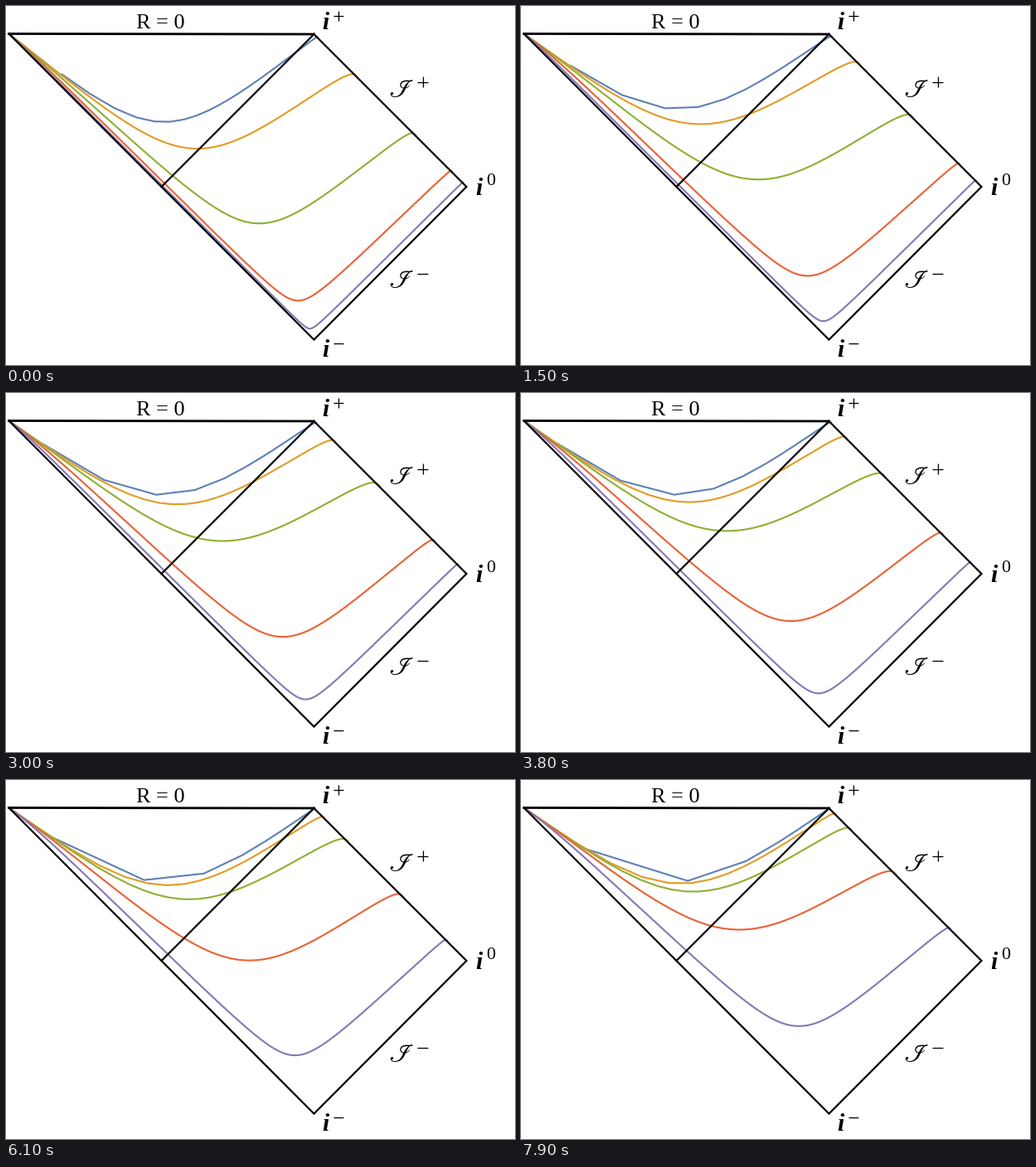
A matplotlib script that plays this animation: 614 px wide and 433 px high, repeating every 8000 ms.

```python
import matplotlib.pyplot as plt
import numpy as np
from matplotlib.animation import FuncAnimation

W, H, DPI = 614, 433, 100
FRAMES, STEP = 80, 100
SIDE = 368.5                     # length of a null edge in p and q
PX = 72 / DPI
COLORS = ["#5e81b5", "#e19c24", "#8fb032", "#eb6235", "#8778b3"]
BOOSTS = 1.29 * np.array([0, 2, 3, 4, 5])
RATE = 0.2567                    # boost per second

plt.rcParams["mathtext.fontset"] = "stix"

# Spacing and offset of the sample points as the slices settle
KEYS = [0, 0.8, 2.2, 3.8, 5.1, 7.0, 7.9]
SPACING = [0.075, 0.1306, 0.188, 0.206, 0.272, 0.335, 0.378]
OFFSET = [2.4, 1.24, 0.27, 0.13, -0.1, -0.1, -0.12]


def product(r):
    """Kruskal product UV at radius r, with M = 1."""
    return (1 - r / 2) * np.exp(r / 2)


def trumpet(r0, k=0.47):
    """Hyperboloidal slice ending at the cylinder r0: log V and r."""
    root = np.sqrt(2 / r0 - 1)
    c = (1 / (r0**2 * root) - k) * r0**3 / 2
    b = -root - k * r0 + c / r0**2
    d = np.geomspace(1e-6, 60, 4000)
    r = r0 + d
    a = k * r + b - c / r**2
    s = np.sqrt(np.maximum(a**2 + 1 - 2 / r, 1e-14))
    g = d / (s * (s - a)) / 4
    steps = (g[1:] + g[:-1]) / 2 * np.diff(np.log(d))
    log_v = np.concatenate([[0], np.cumsum(steps)])
    log_v += np.log(-product(r[-1])) - log_v[-1] - log_v[-1] * 0
    # scaled so that U tends to -1 at future null infinity
    return log_v, r


def to_stage(u, v):
    p = np.arctan(v) * 2 / np.pi * SIDE
    q = SIDE - np.arctan(u) * 2 / np.pi * SIDE
    return 3 + (p + q) / 2, 33.2 + (q - p) / 2


def slices(t):
    log_v, r = trumpet(1.852 + 0.051 * np.exp(-t / 0.6))
    n = np.arange(1, 41)
    near = (np.interp(t, KEYS, SPACING) * (n + np.interp(t, KEYS, OFFSET))) ** 2
    far = np.geomspace(near[-1], 1e15, 500)[1:]
    samples = np.log(np.concatenate([near, far]))
    for boost in BOOSTS:
        lv = samples - boost
        log_end = 0.535 - RATE * t + boost - BOOSTS[2]
        radius = np.interp(lv + log_end, log_v, r)
        v = np.exp(lv)
        yield to_stage(product(radius) / v, v)


fig = plt.figure(figsize=(W / DPI, H / DPI), dpi=DPI, facecolor="white")
ax = fig.add_axes([0, 0, 1, 1])
ax.set_xlim(-0.5, W - 0.5)
ax.set_ylim(H - 0.5, -0.5)
ax.axis("off")


def stroke(points, width=2.2, **kw):
    x, y = zip(*points)
    ax.plot(x, y, color="black", lw=width * PX, solid_joinstyle="miter", **kw)


def label(x, y, text, size, **kw):
    ax.text(x, y, text, fontsize=size * PX, family="Liberation Serif",
            va="baseline", **kw)


def sign(x, y, half, plus):
    stroke([(x - half, y), (x + half, y)], 1.3, solid_capstyle="butt")
    if plus:
        stroke([(x, y - half), (x, y + half)], 1.3, solid_capstyle="butt")


curves = [ax.plot([], [], color=c, lw=2.1 * PX, solid_joinstyle="round")[0]
          for c in COLORS]

LEFT, TOP, RIGHT, BOTTOM, MID = (3, 33), (371, 33.5), (555, 217.5), (371, 402), (187, 217.5)
stroke([TOP, RIGHT, BOTTOM, LEFT])
stroke([MID, TOP])
stroke([LEFT, TOP], 2.8)

label(156.5, 26.5, "R = 0", 26.2)
for x, y in [(381, 27.5), (566, 227.5), (381, 422.5)]:
    label(x, y, "i", 30, style="italic", weight="bold")
label(579, 216, "0", 22)
sign(400.5, 11.5, 5.8, True)
sign(400.5, 406, 5.8, False)
for y, plus in [(109, True), (340, False)]:
    label(461, y, r"$\mathscr{I}$", 31)
    sign(502, y - 18, 6.8, plus)


def draw(i):
    for curve, (x, y) in zip(curves, slices(i * STEP / 1000)):
        curve.set_data(x, y)
    return curves


anim = FuncAnimation(fig, draw, frames=FRAMES, interval=STEP, repeat=True,
                     repeat_delay=0, blit=False)
plt.show()
```
